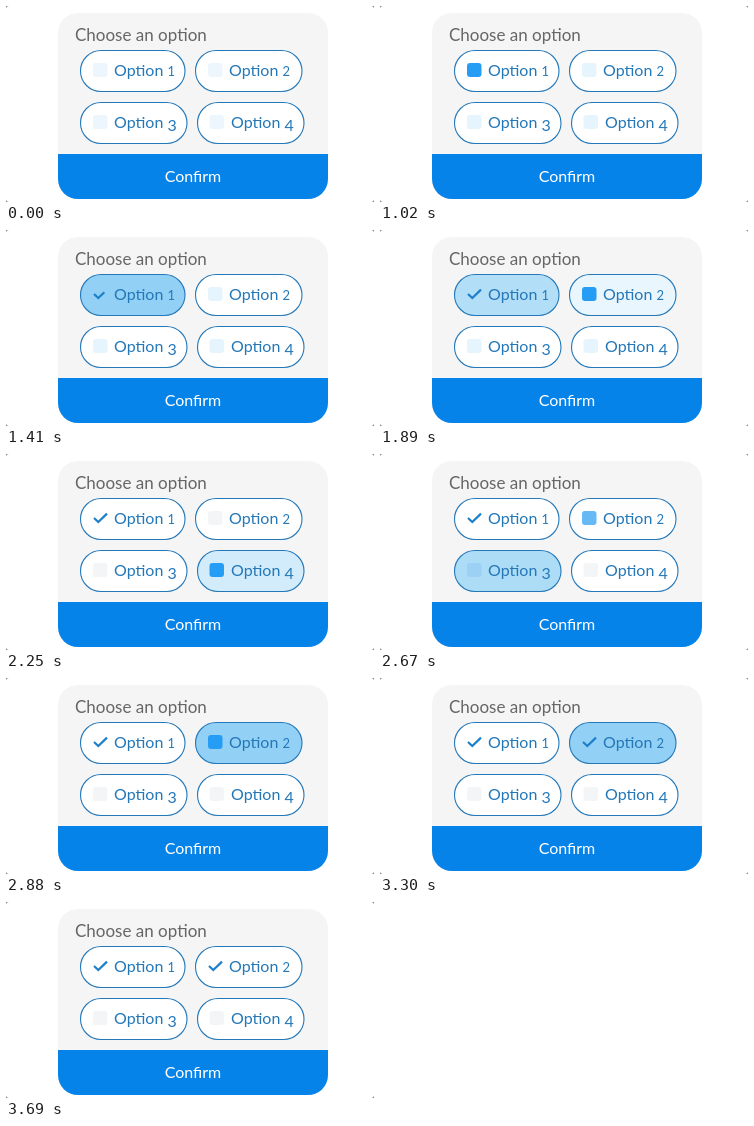
An HTML page that plays this animation: 368x196 px, repeating every 3960 ms.

```html
<!DOCTYPE html>
<html lang="en">
<head>
<meta charset="utf-8">
<title>Choose an option</title>
<style>
  :root {
    --line: #2478b8;
    --hover: #92d0f5;
    --blue: #259df4;
    --faint: #edf5fd;
    --pale: #e6f4fe;
    --grey: #f4f5f6;
  }
  html, body { margin: 0; width: 100%; height: 100%; overflow: hidden; background: #777; }
  svg { display: block; width: 100vw; height: 100vh; }
  text { font: 16px Lato, "Open Sans", sans-serif; fill: var(--line); }
  .title { font-size: 17px; fill: #666; }
  .confirm { fill: #fff; text-anchor: middle; }
  .low { font-size: 13px; }
  .pill { fill: #fff; stroke: var(--line); stroke-width: 1.1; }
  .tick {
    fill: none; stroke: #1c80cb; stroke-width: 2.2;
    stroke-dasharray: 1 2; stroke-dashoffset: 1.02;
  }
  .pill, .box, .tick { animation: 3960ms linear infinite; }

  .one .pill { animation-name: pill1; }
  .two .pill { animation-name: pill2; }
  .three .pill { animation-name: pill3; }
  .four .pill { animation-name: pill4; }
  .one .box { animation-name: box1; }
  .two .box { animation-name: box2; }
  .three .box { animation-name: box3; }
  .four .box { animation-name: box4; }
  .one .tick { animation-name: tick1; }
  .two .tick { animation-name: tick2; }

  /* Hover tint of each option */
  @keyframes pill1 {
    0%, 26%, 51.5%, 100% { fill: #fff; }
    29.8%, 46.2% { fill: var(--hover); }
  }
  @keyframes pill2 {
    0%, 47%, 56%, 67.4%, 93%, 100% { fill: #fff; }
    50.8%, 53%, 71.2%, 86.4% { fill: var(--hover); }
  }
  @keyframes pill3 {
    0%, 58.1%, 69.7%, 100% { fill: #fff; }
    61.9%, 66.7% { fill: var(--hover); }
  }
  @keyframes pill4 {
    0%, 55.3%, 60.3%, 100% { fill: #fff; }
    58.3% { fill: #aadbf7; }
  }

  /* Checkbox squares */
  @keyframes box1 {
    0% { fill: var(--faint); opacity: 1; }
    3.8%, 25% { fill: var(--pale); }
    25.7% { fill: var(--blue); }
    31.8% { fill: var(--blue); opacity: 1; }
    32.6%, 100% { fill: var(--blue); opacity: 0; }
  }
  @keyframes box2 {
    0% { fill: var(--faint); opacity: 1; }
    3.8%, 46.5% { fill: var(--pale); }
    47.2%, 53% { fill: var(--blue); }
    53.8%, 66.9% { fill: var(--grey); }
    67.7% { fill: var(--blue); }
    74.2% { fill: var(--blue); opacity: 1; }
    75%, 100% { fill: var(--blue); opacity: 0; }
  }
  @keyframes box3 {
    0% { fill: var(--faint); }
    3.8%, 49.2% { fill: var(--pale); }
    51.5%, 58.1% { fill: var(--grey); }
    58.8%, 66.7% { fill: var(--blue); }
    68%, 100% { fill: var(--grey); }
  }
  @keyframes box4 {
    0% { fill: var(--faint); }
    3.8%, 49.2% { fill: var(--pale); }
    51.5%, 54.5% { fill: var(--grey); }
    55.3%, 58.3% { fill: var(--blue); }
    59.8%, 100% { fill: var(--grey); }
  }

  /* Check marks drawn after a click */
  @keyframes tick1 {
    0%, 32.6% { stroke-dashoffset: 1.02; }
    36.4%, 100% { stroke-dashoffset: 0; }
  }
  @keyframes tick2 {
    0%, 75% { stroke-dashoffset: 1.02; }
    78.8%, 100% { stroke-dashoffset: 0; }
  }
</style>
</head>
<body>
<svg viewBox="0 0 368 196">
  <rect width="368" height="196" rx="3" fill="#fff"/>
  <rect x="52" y="7" width="270" height="186" rx="20" fill="#f5f5f5"/>
  <path d="M52 148H322V173a20 20 0 0 1-20 20H72a20 20 0 0 1-20-20Z" fill="#0583e9"/>
  <text class="title" x="69" y="34.5">Choose an option</text>

  <g class="one">
    <rect class="pill" x="74.5" y="44.5" width="104.5" height="41" rx="20.5"/>
    <rect class="box" x="87" y="57" width="14.5" height="14" rx="3"/>
    <path class="tick" pathLength="1" d="M88 64L92.3 68L101 59.6"/>
    <text x="108" y="70">Option <tspan class="low">1</tspan></text>
  </g>
  <g class="two">
    <rect class="pill" x="189.5" y="44.5" width="106.5" height="41" rx="20.5"/>
    <rect class="box" x="202" y="57" width="14.5" height="14" rx="3"/>
    <path class="tick" pathLength="1" d="M203 64L207.3 68L216 59.6"/>
    <text x="223" y="70">Option <tspan class="low">2</tspan></text>
  </g>
  <g class="three">
    <rect class="pill" x="74.5" y="96.5" width="106.5" height="41" rx="20.5"/>
    <rect class="box" x="87" y="109" width="14.5" height="14" rx="3"/>
    <text x="108" y="122">Option <tspan dy="2.5">3</tspan></text>
  </g>
  <g class="four">
    <rect class="pill" x="191.5" y="96.5" width="106.5" height="41" rx="20.5"/>
    <rect class="box" x="203.5" y="109" width="14.5" height="14" rx="3"/>
    <text x="225" y="122">Option <tspan dy="2.5">4</tspan></text>
  </g>

  <text class="confirm" x="187" y="176">Confirm</text>
</svg>
</body>
</html>
```
